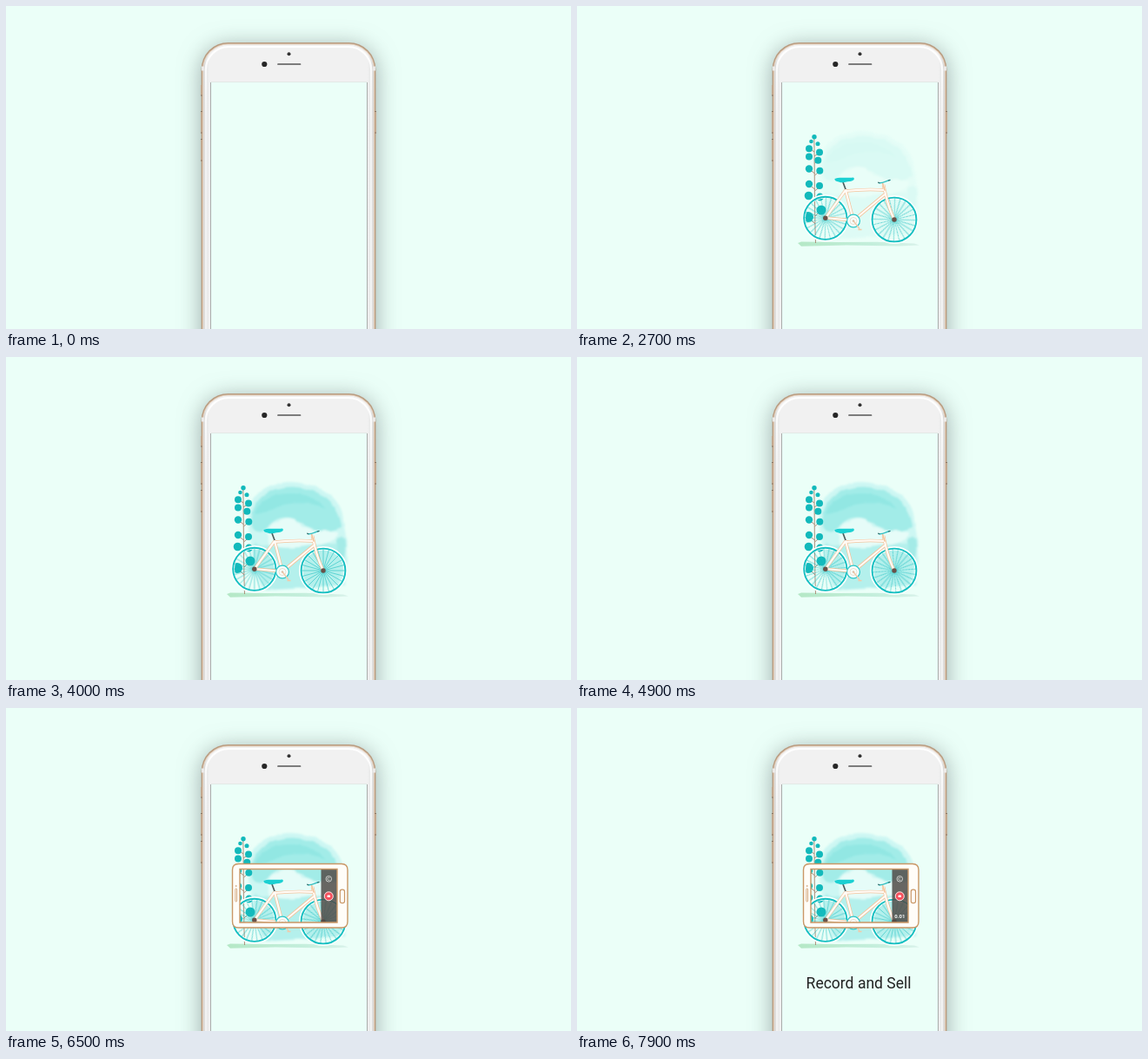
These frames come from a looping animation (650x372 px, 8 s). An HTML page:

```html
<!DOCTYPE html>
<html lang="en">
<head>
<meta charset="utf-8">
<title>Record and Sell</title>
<style>
  html, body { margin: 0; width: 100%; height: 100%; overflow: hidden; background: #ebfff8; }
  svg { display: block; width: 650px; height: 372px; }
  .shadow { filter: drop-shadow(0 4px 13px rgba(75, 88, 92, .5)); }
  .anim, .leaf, .word, .draw, .wheel, .spokes { animation: 8s linear both paused; }
  .wheel, .spokes, .leaf, .pop { transform-box: fill-box; transform-origin: center; }

  .ground { animation-name: spread; transform-origin: 285px 274px; }
  .wheel { animation-name: roll-in; }
  .spokes { animation-name: spin; }
  .draw { animation-name: draw; stroke-dasharray: 1 2; }
  .part { animation-name: pop; animation-delay: .3s; }
  .trunk { animation-name: grow; transform-origin: 274px 273px; }
  .leaf { animation-name: pop; fill: #12b9bb; }
  .wash { animation-name: wash; }
  .camera { animation-name: slide; }
  .ripple { animation-name: ripple; }
  .word { animation-name: rise; font: 17.5px Roboto, sans-serif; fill: #222; }

  @keyframes spread {
    0% { transform: scale(.02, 1); opacity: 0; }
    2% { opacity: 1; }
    11%, 100% { transform: none; opacity: 1; }
  }
  @keyframes roll-in {
    0%, 3% { transform: scale(0); animation-timing-function: ease-out; }
    12% { transform: scale(1.08); }
    16%, 100% { transform: none; }
  }
  @keyframes spin { to { transform: rotate(360deg); } }
  @keyframes draw {
    0%, 9% { stroke-dashoffset: 1; animation-timing-function: ease-in-out; }
    22%, 100% { stroke-dashoffset: 0; }
  }
  @keyframes grow {
    0%, 9% { transform: scaleY(0); animation-timing-function: ease-out; }
    24%, 100% { transform: none; }
  }
  @keyframes pop {
    0%, 15% { transform: scale(0); }
    18.5% { transform: scale(1.2); }
    21%, 100% { transform: none; }
  }
  @keyframes wash { 0%, 30% { opacity: 0; } 47%, 100% { opacity: 1; } }
  @keyframes slide {
    0%, 62.5% { transform: translateX(160px); }
    66.25% { transform: translateX(95px); }
    68.75% { transform: translateX(25px); }
    70% { transform: translateX(-6px); }
    71.25% { transform: translateX(-12px); }
    72.5% { transform: translateX(-7.5px); }
    76.25%, 100% { transform: none; }
  }
  @keyframes ripple {
    0%, 85% { transform: scale(0); opacity: .9; }
    88.75% { transform: none; opacity: .85; }
    92.5%, 100% { transform: scale(1.15); opacity: 0; }
  }
  @keyframes rise {
    0%, 85% { transform: translateY(78px); filter: url(#smear); }
    86.25% { transform: translateY(41px); filter: url(#smear); }
    87.5% { transform: translateY(1px); filter: none; }
    88.75% { transform: translateY(-12px); }
    90% { transform: translateY(-7px); }
    92.5%, 100% { transform: none; filter: none; }
  }
</style>
</head>
<body>
<svg viewBox="0 0 650 372">
  <defs>
    <clipPath id="screen"><rect x="236" y="88" width="179.5" height="284"/></clipPath>
    <linearGradient id="grass">
      <stop offset="0" stop-color="#b4e8c6"/>
      <stop offset=".6" stop-color="#c3eedb"/>
      <stop offset="1" stop-color="#d8f2ea"/>
    </linearGradient>
    <linearGradient id="body">
      <stop offset="0" stop-color="#d3d0cd"/>
      <stop offset=".015" stop-color="#e4e5e5"/>
      <stop offset=".035" stop-color="#f1f1f1"/>
      <stop offset=".965" stop-color="#f1f1f1"/>
      <stop offset=".985" stop-color="#e4e5e5"/>
      <stop offset="1" stop-color="#d3d0cd"/>
    </linearGradient>
    <linearGradient id="shine" gradientUnits="userSpaceOnUse" x1="0" y1="46" x2="0" y2="130">
      <stop offset="0" stop-color="#fff"/>
      <stop offset="1" stop-color="#fff" stop-opacity=".55"/>
    </linearGradient>
    <filter id="paint" x="-10%" y="-10%" width="120%" height="120%">
      <feTurbulence type="fractalNoise" baseFrequency=".07" numOctaves="2" seed="4"/>
      <feDisplacementMap in="SourceGraphic" scale="4" xChannelSelector="R" yChannelSelector="G"/>
      <feGaussianBlur stdDeviation=".8"/>
    </filter>
    <filter id="smear" x="-10%" y="-60%" width="120%" height="220%">
      <feOffset in="SourceGraphic" dy="-3.5" result="up"/>
      <feOffset in="SourceGraphic" dy="3.5" result="down"/>
      <feMerge result="all"><feMergeNode in="up"/><feMergeNode in="SourceGraphic"/><feMergeNode in="down"/></feMerge>
      <feGaussianBlur in="all" stdDeviation="0 1"/>
      <feComponentTransfer><feFuncA type="linear" slope=".6"/></feComponentTransfer>
    </filter>
  </defs>

  <!-- Handset -->
  <rect width="650" height="372" fill="#ebfff8"/>
  <rect class="shadow" x="224.6" y="42" width="200.800" height="420" rx="31" fill="#b99c80"/>
  <rect x="226" y="43.600" width="198" height="420" rx="29.500" fill="#e6d3c0"/>
  <rect x="227" y="44.600" width="196" height="420" rx="28.500" fill="url(#body)"/>
  <rect x="229.800" y="47" width="190.400" height="420" rx="26.500" fill="none" stroke="url(#shine)" stroke-width="2.200"/>
  <path d="M225 72h3M422 72h3" stroke="#eceae8" stroke-width="5"/>
  <path d="M224.500 91v12M224.500 121v26M224.500 153v26M425.500 121v26" stroke="#c9b199" stroke-width="1.200"/>
  <path d="M224 103h2M224 121.500h2M224 146h2M224 153.500h2M224 178h2M424 121.500h2M424 146h2" stroke="#8b7765"/>
  <circle cx="325.500" cy="55.300" r="2" fill="#333"/>
  <circle cx="297.300" cy="67" r="3.100" fill="#262626"/>
  <path d="M313 67h25.500" stroke="#555" stroke-width="1.700" stroke-linecap="round"/>
  <path d="M236 88h179.500v290H236z" fill="#ebfff8"/>
  <path d="M235.500 88v290M415.500 88v290" stroke="#a9acab"/>
  <path d="M235.500 87.500h180" stroke="#e3e8e6"/>

  <g clip-path="url(#screen)">
    <!-- Watercolour -->
    <g class="anim wash">
      <g filter="url(#paint)">
        <path d="M280 196C273 162 298 143 329 144C362 146 388 163 388 189C394 203 395 240 389 264L300 269C282 264 283 215 280 196Z" fill="#cdf7f3"/>
        <path d="M283 194C279 165 303 149 330 149.500C360 151 384 168 386 196C368 204 352 201 343 193C330 181 311 182 301 196C296 203 285 204 283 194Z" fill="#a2ece8"/>
        <path d="M286 180C295 153 347 148 368 174C350 167 328 166 310 174C300 178 292 184 286 180Z" fill="#92e7e3"/>
        <path d="M286 214C310 221 330 214 348 214C364 212 380 219 391 208C393 229 388 250 380 264L300 268C286 250 284 230 286 214Z" fill="#b4f0ec"/>
        <path d="M381 210C385 203 391 207 391 218C392 233 386 238 381 229Z" fill="#a4ebe7"/>
        <path d="M304 217C297 203 302 190 314 190C321 182 335 185 340 195C355 203 370 199 382 201C381 213 365 217 350 217C334 220 316 221 304 217Z" fill="#e6fcf8"/>
      </g>
    </g>

    <!-- Ground -->
    <path class="anim ground" d="M254 273L258 271.500L300 272L345 271.800L388 273.500L394 275.500L370 276.500L310 275.500L258 276.800Z" fill="url(#grass)"/>

    <!-- Tree -->
    <path class="anim trunk" d="M272.800 151C273.500 185 273 230 274.500 273M273 168l-6 -4M273 173l6 -4M273.500 181l4 -3M273.500 193l-6 -5M273.500 195l6 -5M273.500 211l-6 -5M273.500 213l6 -5M274 226l-7 -7M274 242l7 -7M274 251l-8 -8" fill="none" stroke="#a98470" stroke-width=".9"/>
    <g id="leaves"></g>

    <!-- Bicycle -->
    <g id="wheels"></g>
    <g fill="none" stroke-linejoin="round">
      <path class="draw tube" pathLength="1" stroke="#f3c39c" stroke-width="3.600"/>
      <path class="draw tube" pathLength="1" stroke="#fffbf6" stroke-width="2.200"/>
    </g>
    <g id="hubs"></g>
    <g class="anim pop part">
      <path d="M306 203L309 211" stroke="#4b5b5c" stroke-width="1.700"/>
      <path d="M296.500 199C300 196.500 312 198.500 318 197.500C320 199 318.500 201.500 314 202C308 202.500 306 204.500 301 202.500C298 202 296 201 296.500 199Z" fill="#1bd0d2"/>
    </g>
    <g class="anim pop part" fill="none" stroke-linecap="round">
      <path d="M351.500 204L354 212" stroke="#f3c39c" stroke-width="1.600"/>
      <path d="M347 203.500C351 205 356 201 360 200.500" stroke="#35bfc1" stroke-width="1.500"/>
      <path d="M346.500 203.200L348 203.800M358.500 200.900L360 200.500" stroke="#3d5c5c"/>
    </g>
    <g class="anim pop part" fill="none">
      <circle cx="318" cy="247.500" r="7.400" fill="#f6fffc" stroke="#2cc7c9" stroke-width="1.200"/>
      <circle cx="318" cy="247.500" r="4" stroke="#e6d3c6" stroke-width=".8"/>
      <path d="M318 247.500L325 256.500M323.500 257.500h4" stroke="#f3c9a8" stroke-width="1.300"/>
      <circle cx="318" cy="247.500" r="1.300" fill="#e0bfa6"/>
    </g>

    <!-- Recording camera -->
    <g class="anim camera">
      <rect x="362.500" y="185.500" width="18.500" height="61.500" fill="#504946" fill-opacity=".84"/>
      <path fill="#fffdf8" fill-rule="evenodd" stroke="#c99766" stroke-width="1.400"
        d="M267.500 179.500H386Q393 179.500 393 186.500V246Q393 253 386 253H267.500Q260.500 253 260.500 246V186.500Q260.500 179.500 267.500 179.500ZM269 185.500V247H381V185.500Z"/>
      <g fill="none" stroke="#c99766">
        <rect x="263.800" y="208" width="1.800" height="15" rx=".9" stroke-width=".8"/>
        <circle cx="264.700" cy="205" r=".6" stroke-width=".8"/>
        <rect x="384.300" y="209.200" width="5.200" height="15.500" rx="2.200" stroke-width="1.200"/>
      </g>
      <g fill="none" stroke="#e8e6e4" stroke-width=".8">
        <circle cx="371.300" cy="196.800" r="3.300"/>
        <path d="M372.600 195.700a1.600 1.600 0 1 0 0 2.200"/>
      </g>
      <circle cx="371.300" cy="216.800" r="5" fill="#f4505d" stroke="#ffe9e9"/>
      <rect x="369.600" y="215.600" width="3.400" height="2.400" rx=".6" fill="#fff"/>
      <g class="anim pop ripple" fill="none" stroke="#159497" stroke-width=".7">
        <circle cx="371.500" cy="217" r="10" fill="#20b3b4" stroke="none"/>
        <circle cx="371.500" cy="217" r="7"/>
        <circle cx="371.500" cy="217" r="4.500"/>
      </g>
      <text id="timer" x="371.300" y="242" text-anchor="middle" font-family="Roboto, sans-serif" font-weight="700" font-size="6" fill="#fff"></text>
    </g>

    <!-- Caption -->
    <text class="word" x="263.600" y="322.500">Record</text>
    <text class="word" x="322.900" y="322.500" style="animation-delay:.1s">and</text>
    <text class="word" x="356.300" y="322.500" style="animation-delay:.2s">Sell</text>
  </g>
</svg>
<script>
  const LOOP = 8000, STEP = 100;
  const byId = id => document.getElementById(id);

  function add(parent, tag, attrs) {
    const el = document.createElementNS('http://www.w3.org/2000/svg', tag);
    for (const key in attrs) el.setAttribute(key, attrs[key]);
    return parent.appendChild(el);
  }

  // Leaves from the root upwards: x, y, radius
  const leaves = [
    [266, 243, 6], [281, 235, 5.5], [279.5, 220, 4.4], [266.5, 218.5, 4.8],
    [279, 207, 4], [267, 205, 4.2], [279.3, 189.7, 4], [267, 187.5, 4.2],
    [277.3, 177.8, 4], [267, 173.5, 4], [279, 168.5, 4], [267, 164.3, 4],
    [277, 158.8, 2.5], [269.5, 156, 2.3], [273, 150.8, 2.7]
  ];
  leaves.forEach(([cx, cy, r], i) => {
    add(byId('leaves'), 'circle', { class: 'leaf', cx, cy, r, style: `animation-delay:${i * 60}ms` });
  });

  function wheel(cx, cy, r) {
    const group = add(byId('wheels'), 'g', { class: 'wheel', fill: 'none' });
    add(group, 'circle', { cx, cy, r, stroke: '#f9fffd', 'stroke-width': 4.4 });
    const count = 24;
    let d = '';
    for (let i = 0; i < count; i++) {
      const a = i / count * 2 * Math.PI;
      d += `M${cx} ${cy}l${(r * Math.cos(a)).toFixed(2)} ${(r * Math.sin(a)).toFixed(2)}`;
    }
    const spokes = add(group, 'g', { class: 'spokes' });
    add(spokes, 'circle', { cx, cy, r });
    add(spokes, 'path', { d, stroke: '#1fbfc1', 'stroke-width': .6 });
    add(group, 'circle', { cx, cy, r: r - .4, stroke: '#14bfc1', 'stroke-width': 1.9 });
    add(byId('hubs'), 'circle', { class: 'wheel', cx, cy, r: 2.7, fill: '#6a5148' });
  }
  wheel(285.8, 244.3, 25);
  wheel(365, 246, 25.8);

  const frame = 'M286 244L309 212L318 247ZM309.500 213Q332 210.500 354 212M354 217L318 247M352.500 206L355 217Q358 231 365 246';
  document.querySelectorAll('.tube').forEach(path => path.setAttribute('d', frame));

  const animations = document.getAnimations();
  function tick(now) {
    const t = Math.floor(now % LOOP / STEP) * STEP;
    for (const animation of animations) animation.currentTime = t;
    byId('timer').textContent = t < 7400 ? '' : t < 7700 ? '0.00' : '0.01';
    requestAnimationFrame(tick);
  }
  tick(0);
</script>
</body>
</html>
```
